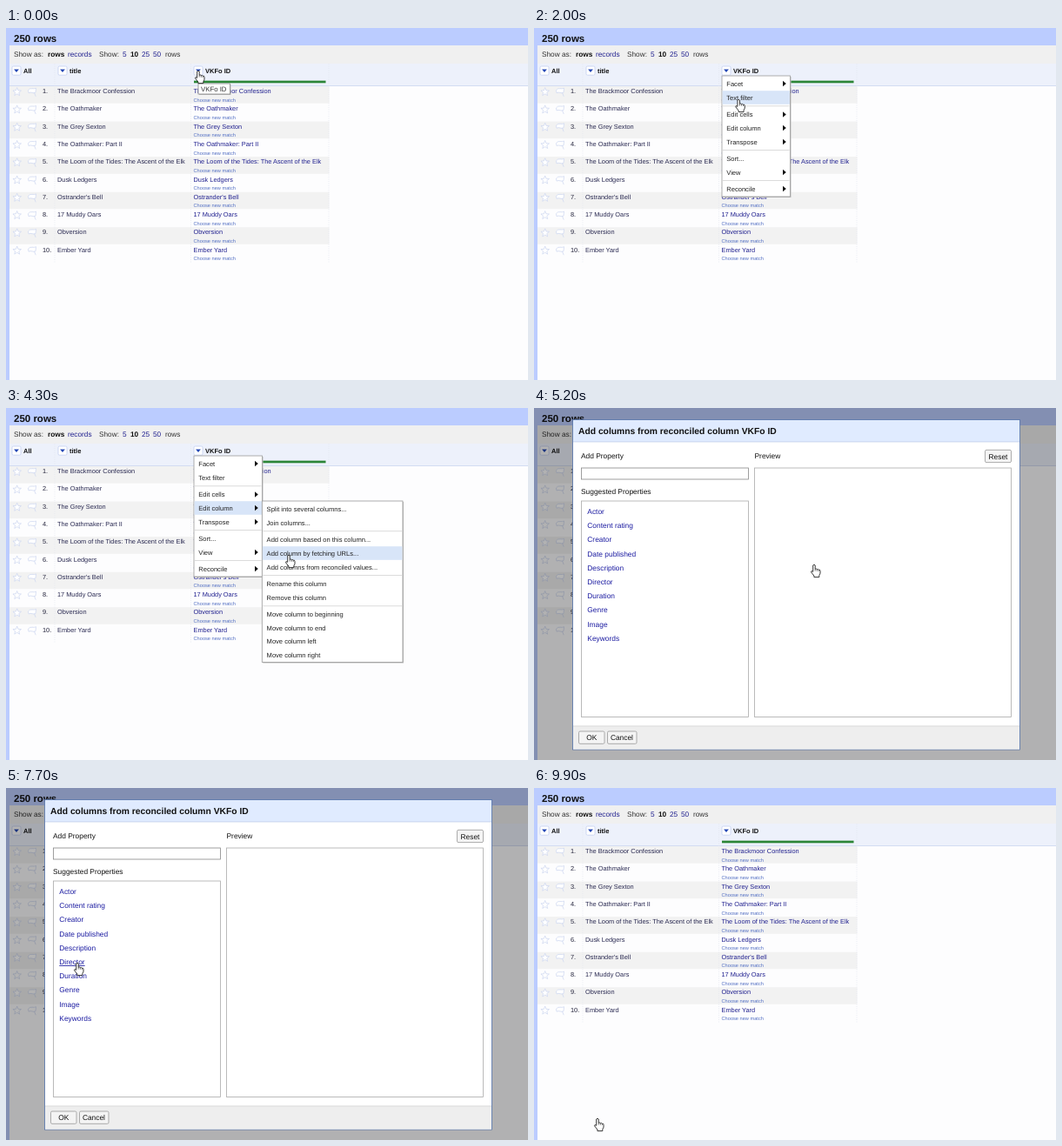
Animation of 600 by 405 pixels, one loop 10 s. Source, as an HTML page:

```html
<!DOCTYPE html>
<html lang="en">
<head>
<meta charset="utf-8">
<title>Add columns from reconciled values</title>
<style>
html, body { margin: 0; width: 100%; height: 100%; overflow: hidden; background: #fdfdfe; }
svg { display: block; width: 100vw; height: 100vh; }
text { font-family: "Liberation Sans", Arial, sans-serif; text-rendering: geometricPrecision; white-space: pre; }
</style>
</head>
<body>
<svg id="stage" viewBox="0 0 600 405"></svg>
<script>
const LOOP = 10000, STEP = 100;
const MENU_OPEN = 1500, SUB_OPEN = 2400, DIALOG_OPEN = 4800, DIALOG_CLOSE = 9700;
const ID = 'VKFo ID';
const INK = '#24243c', LINK = '#20208f', BLUE = '#bbccff';
const stage = document.getElementById('stage');

function el(parent, tag, attrs) {
  const node = document.createElementNS('http://www.w3.org/2000/svg', tag);
  for (const key in attrs) node.setAttribute(key, attrs[key]);
  return parent.appendChild(node);
}
const group = () => el(stage, 'g', {});
const rect = (p, x, y, width, height, fill, stroke = 'none', rx = 0) =>
  el(p, 'rect', { x, y, width, height, fill, stroke, rx, 'stroke-width': 0.8 });
const path = (p, d, fill, stroke = 'none', width = 0.8) =>
  el(p, 'path', { d, fill, stroke, 'stroke-width': width, 'stroke-linejoin': 'round' });
function text(p, str, x, y, size, fill = '#111', bold = false) {
  const node = el(p, 'text', { x, y, fill, 'font-size': size, 'font-weight': bold ? 700 : 400 });
  node.textContent = str;
  return node;
}
const show = (node, on) => node.setAttribute('visibility', on ? 'inherit' : 'hidden');

// Table page
const page = group();
rect(page, 0, 0, 600, 405, '#fdfdfe');
rect(page, 4, 20, 596, 21, '#f0f0f0');
rect(page, 4, 41, 596, 25, '#edf1fb');
rect(page, 4, 66, 596, 1, '#d3dcf2');
rect(page, 0, 0, 600, 20, BLUE);
rect(page, 0, 0, 4, 405, BLUE);
text(page, '250 rows', 9, 15.5, 11.5, '#111', true);

[['Show as:', 9], ['rows', 48, '#111', true], ['records', 71, LINK], ['Show:', 107],
 ['5', 134, LINK], ['10', 143, '#111', true], ['25', 156, LINK], ['50', 169, LINK], ['rows', 183]]
  .forEach(([str, x, fill = '#333', bold]) => text(page, str, x, 33.1, 8.25, fill, bold));

[['All', 12], ['title', 65], [ID, 221]].forEach(([str, x]) => {
  rect(page, x - 5, 44, 10, 10.2, '#fff', '#c3cff0', 1.5);
  path(page, `M${x - 2.9} 47.5h5.8l-2.9 3.6z`, '#2347b5');
  text(page, str, x + 8, 52, 7.5, '#111', true);
});
rect(page, 216, 60.6, 151.5, 2.7, '#2b8536');

const starPath = (cx, cy) => 'M' + Array.from({ length: 10 }, (_, i) => {
  const r = i % 2 ? 2.2 : 5, a = (i / 5 - 0.5) * Math.PI;
  return (cx + r * Math.cos(a)).toFixed(2) + ' ' + (cy + r * Math.sin(a)).toFixed(2);
}).join('L') + 'Z';

['The Brackmoor Confession', 'The Oathmaker', 'The Grey Sexton', 'The Oathmaker: Part II',
 'The Loom of the Tides: The Ascent of the Elk', 'Dusk Ledgers', "Ostrander's Bell",
 '17 Muddy Oars', 'Obversion', 'Ember Yard'].forEach((title, i) => {
  const y = 75.2 + i * 20.28;
  if (i % 2 === 0) rect(page, 4, y - 8.2, 367.5, 19.6, '#f2f2f2');
  path(page, starPath(12.7, y - 1.6), '#fff', '#cbd5ef', 0.7);
  path(page, `M25.5 ${y - 3.5}q1.5-2.5 4.5-2t4.5-.5l-.5 5q-2 1-4 .2t-4 .3zM32.5 ${y - 0.7}l1.7 4.2`,
    '#fff', '#cbd5ef', 0.7);
  text(page, i + 1 + '.', 42, y, 7.4, INK);
  text(page, title, 59, y, 7.37, '#282850');
  text(page, title, 215.5, y, 7.37, LINK);
  text(page, 'Choose new match', 215.5, y + 9.5, 5.67, '#5470c4');
});
[56, 212.5, 371].forEach(x =>
  el(page, 'path', { d: `M${x} 41V270`, stroke: '#dfe3ec', 'stroke-width': 0.6, 'stroke-dasharray': '1 1.5' }));

// Tooltip
const tip = group();
rect(tip, 222, 65, 36.5, 12, '#bbb');
rect(tip, 221, 64, 36.5, 12, '#fff', '#888');
text(tip, ID, 224, 73, 7.8, '#333');

// Menus: each item is [label, centre y]
function makeMenu(x, y, w, h, items, seps, arrows = []) {
  const g = group();
  rect(g, x + 1, y + 1, w, h, '#bbb');
  rect(g, x, y, w, h, '#fff', '#999');
  seps.forEach(s => rect(g, x + 1, s, w - 2, 0.7, '#ccc'));
  const bars = items.map(([label, cy]) => {
    const bar = rect(g, x + 0.6, cy - 7.8, w - 1.2, 15.6, '#d8e5f8');
    text(g, label, x + 5.3, cy + 2.5, 7.55, '#222');
    if (arrows.includes(label)) path(g, `M${x + w - 8.5} ${cy - 3.2}l3.8 3.2l-3.8 3.2z`, '#111');
    return bar;
  });
  return { g, x, w, items, bars };
}
const menu = makeMenu(216, 55, 78.5, 139, [['Facet', 64], ['Text filter', 80], ['Edit cells', 99.5],
  ['Edit column', 115], ['Transpose', 131], ['Sort...', 150], ['View', 166], ['Reconcile', 185]],
  [89.5, 140.3, 175.3], ['Facet', 'Edit cells', 'Edit column', 'Transpose', 'View', 'Reconcile']);
const submenu = makeMenu(294.3, 107, 161.7, 185.5, [['Split into several columns...', 116],
  ['Join columns...', 132], ['Add column based on this column...', 151.5],
  ['Add column by fetching URLs...', 167], ['Add columns from reconciled values...', 183],
  ['Rename this column', 202], ['Remove this column', 218], ['Move column to beginning', 237.5],
  ['Move column to end', 253], ['Move column left', 268.7], ['Move column right', 284.4]],
  [141.4, 192.3, 227.5]);

const hovered = (m, x, y) => x < m.x || x > m.x + m.w ? -1 :
  m.items.findIndex(([, cy]) => Math.abs(y - cy) <= 7.9);
const light = (m, index) => m.bars.forEach((bar, i) => show(bar, i === index));

// Dialog
const dialog = group();
el(dialog, 'rect', { width: 600, height: 405, fill: '#000', 'fill-opacity': 0.3 });
rect(dialog, 44.5, 13.5, 514, 379.5, '#fff', '#4f6fa8');
rect(dialog, 45, 14, 513, 25, '#e0ebff');
rect(dialog, 45, 38.6, 513, 0.7, '#b9c9e6');
rect(dialog, 45, 366, 513, 26.6, '#eee');
rect(dialog, 45, 365.6, 513, 0.7, '#ccc');
text(dialog, 'Add columns from reconciled column ' + ID, 51, 30.2, 10.3, '#111', true);
text(dialog, 'Add Property', 54, 58.2, 8.4);
text(dialog, 'Suggested Properties', 54, 98.7, 8.4);
text(dialog, 'Preview', 253.5, 58.2, 8.4);
rect(dialog, 54.5, 69, 192, 13, '#fff', '#888');
rect(dialog, 54.5, 107, 192, 248.5, '#fff', '#aaa');
rect(dialog, 253.5, 69, 295, 286.5, '#fff', '#aaa');
[['Reset', 518.5, 48.3, 30, 4], ['OK', 51.5, 372, 29.5, 8.7], ['Cancel', 84.5, 372, 33.5, 3.4]]
  .forEach(([label, x, y, w, pad]) => {
    rect(dialog, x, y, w, 14.3, '#f4f4f4', '#999', 1.5);
    text(dialog, label, x + pad, y + 10.2, 8.4);
  });
const props = ['Actor', 'Content rating', 'Creator', 'Date published', 'Description', 'Director',
  'Duration', 'Genre', 'Image', 'Keywords'].map((name, i) => {
  const y = 122 + i * 16.2;
  return { y, node: text(dialog, name, 61.3, y, 8.4, '#1a1aa0') };
});

// Hand pointer, origin at the fingertip
const hand = group();
path(hand, 'M-1.3 1Q0-.6 1.2 1V5.3Q2.3 4.4 3.3 5.7Q4.4 4.9 5.3 6.2Q6.8 5.6 7 7.4V10.2L5.8 12.7V14.6H-.1V13L-3.5 8.8Q-3.7 6.7-1.3 8.3Z',
  '#fff', '#222', 0.9);
path(hand, 'M1.2 5.3V7.6M3.3 5.7V7.8M5.3 6.2V8', 'none', '#222', 0.6);

// Pointer route: time, x, y
const route = [[0, 221, 49], [1600, 221, 49], [2400, 249.5, 115], [2900, 249.5, 115], [3400, 302, 117],
  [3900, 326, 150], [4300, 325, 169], [4700, 322, 180], [6000, 322, 180], [7400, 82, 201],
  [8400, 82, 201], [9300, 73, 380], [LOOP, 73, 380]];
function pointer(t) {
  const i = route.findIndex(p => p[0] > t);
  const [a, b] = [route[i - 1], route[i]];
  const k = (t - a[0]) / (b[0] - a[0]), e = k * k * (3 - 2 * k);
  return [a[1] + (b[1] - a[1]) * e, a[2] + (b[2] - a[2]) * e];
}

function draw(t) {
  const [x, y] = pointer(t);
  hand.setAttribute('transform', `translate(${x.toFixed(2)} ${y.toFixed(2)})`);
  const menuOpen = t >= MENU_OPEN && t < DIALOG_OPEN;
  const subOpen = menuOpen && t >= SUB_OPEN;
  const dialogOpen = t >= DIALOG_OPEN && t < DIALOG_CLOSE;
  show(tip, t < MENU_OPEN);
  show(menu.g, menuOpen);
  show(submenu.g, subOpen);
  show(dialog, dialogOpen);
  // "Edit column" stays lit while its submenu is open
  light(menu, subOpen ? 3 : menuOpen ? hovered(menu, x, y) : -1);
  light(submenu, subOpen ? hovered(submenu, x, y) : -1);
  props.forEach(({ y: base, node }) => {
    const over = dialogOpen && x > 61 && x < 118 && y > base - 7.5 && y < base + 2;
    node.setAttribute('text-decoration', over ? 'underline' : 'none');
  });
}

const start = performance.now();
function tick() {
  const t = (performance.now() - start) % LOOP;
  draw(Math.floor(t / STEP) * STEP);
  requestAnimationFrame(tick);
}
draw(0);
requestAnimationFrame(tick);
</script>
</body>
</html>
```
